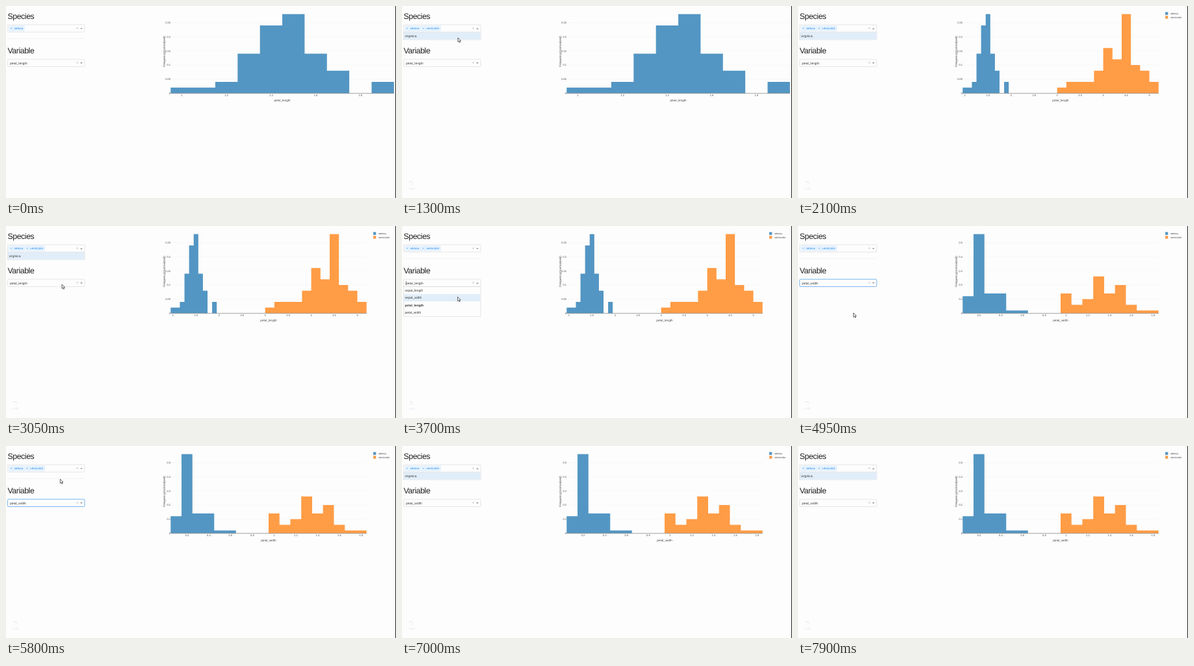
Animation, 600 px wide and 296 px high, one loop 8000 ms. Source, as an HTML page:

```html
<!DOCTYPE html>
<html lang="en">
<head>
<meta charset="utf-8">
<title>Iris histogram</title>
<style>
  html, body { margin: 0; width: 100%; height: 100%; overflow: hidden; background: #fdfdfd; }
  svg { display: block; width: 600px; height: 296px; }
  text { font-family: "Liberation Sans", Arial, sans-serif; text-rendering: geometricPrecision; fill: #444; }
  .head { font-size: 12.3px; letter-spacing: -.4px; fill: #222; }
  .opt { font-size: 4.9px; fill: #333; }
  .tag { font-size: 4.7px; fill: #1a85e8; }
  .tick { font-size: 4px; }
  .title { font-size: 4.65px; }
  .mid { text-anchor: middle; }
  .end { text-anchor: end; }
  .box { fill: #fdfdfd; stroke: #ccc; stroke-width: .5; }
  .focus { stroke: #4a9be8; stroke-width: .75; }
  .hot { fill: #e1eef9; }
  .grey { fill: #888; }
  .pill { fill: #ebf5ff; stroke: #c2e0ff; stroke-width: .4; }
  .grid { stroke: #f0f0f0; stroke-width: .5; }
  .axis { stroke: #666; stroke-width: .6; }
  .caret { stroke: #222; stroke-width: .5; }
  .undo { fill: none; stroke: #dfe6ef; stroke-width: .7; }
</style>
</head>
<body>
<svg viewBox="0 0 600 296">
  <rect width="600" height="296" fill="#fdfdfd"/>
  <rect x="599" width="1" height="296" fill="#222"/>
  <text class="head" x="2.4" y="20">Species</text>
  <text class="head" x="2.4" y="73.2">Variable</text>
  <path d="M2 50.3H121" stroke="#ececec" stroke-width=".6"/>
  <g id="chart"></g>
  <g id="form"></g>
  <g id="undo">
    <path class="undo" d="M12.4 270V272H14.4M12.6 271.9C14 270.2 16.8 271 16.8 273.2C16.8 275 15 275.8 13.6 275.2"/>
    <text class="mid" x="14.7" y="283" style="font-size:4.6px;fill:#dfe6ef">undo</text>
  </g>
  <path id="cursor" d="M0 0V6.4L1.5 5.1 2.6 7.4 3.6 6.9 2.6 4.7H4.6Z" fill="#fff" stroke="#222" stroke-width=".7"/>
</svg>
<script>
const $ = id => document.getElementById(id);
const LEFT = 253.3, BASE = 134.5, PLOT_H = 122;
const MENU_Y = 93.5, ROW = 11.35;
const COLORS = ['#5396c3', '#ff9c46'];
const SPECIES = ['setosa', 'versicolor', 'virginica'];
const VARS = ['sepal_length', 'sepal_width', 'petal_length', 'petal_width'];

// Flowers per bin, 50 of each species; axes and ticks follow from these
const bins = (from, size, ...counts) => ({ from, size, counts });
const setosaLength = bins(.95, .1, 1, 1, 2, 7, 12, 14, 7, 4, 0, 2);
const charts = [
  { name: VARS[2], series: [setosaLength] },
  { name: VARS[2], series: [setosaLength, bins(3, .2, 1, 2, 2, 2, 4, 8, 6, 14, 5, 4, 2)] },
  { name: VARS[3], series: [bins(.05, .1, 6, 28, 7, 7, 1, 1), bins(.95, .1, 7, 3, 5, 13, 7, 10, 3, 1, 1)] }
];

const text = (cls, x, y, s, extra = '') => `<text class="${cls}" x="${x}" y="${y}" ${extra}>${s}</text>`;
const rect = (x, y, w, h, attrs) => `<rect x="${x}" y="${y}" width="${w}" height="${h}" ${attrs}/>`;
const line = (cls, d) => `<path class="${cls}" d="${d}"/>`;

function ticks(lo, hi, rough) {
  const step = [.05, .1, .2, .5].find(s => s >= rough);
  const first = Math.ceil(lo / step), n = Math.floor(hi / step + .01) - first + 1;
  return Array.from({ length: n }, (_, i) => +((first + i) * step).toFixed(2));
}

function drawChart({ name, series }) {
  const legend = series.length > 1, right = legend ? 554.7 : 596.8;
  const lo = series[0].from;
  const hi = Math.max(...series.map(s => s.from + s.size * s.counts.length));
  const top = Math.max(...series.flatMap(s => s.counts)) / 50;
  const sx = v => LEFT + (v - lo) / (hi - lo) * (right - LEFT);
  const sy = v => BASE - v / top * PLOT_H;
  let out = '';
  for (const v of ticks(0, top, top / 6)) {
    if (v) out += line('grid', `M${LEFT} ${sy(v)}H${right}`);
    out += text('tick end', 253, sy(v) + 1.5, v);
  }
  series.forEach((s, k) => {
    let d = `M${sx(s.from)} ${BASE}`;
    s.counts.forEach((n, i) => d += `V${sy(n / 50)}H${sx(s.from + (i + 1) * s.size)}`);
    out += `<path d="${d}V${BASE}Z" fill="${COLORS[k]}"/>`;
    if (legend) out += rect(565, 9.4 + k * 5.9, 4.3, 4.3, `fill="${COLORS[k]}"`) +
      text('tick', 573, 12.9 + k * 5.9, SPECIES[k]);
  });
  out += line('axis', `M${LEFT} ${BASE + .2}H${right}`);
  for (const v of ticks(lo, hi, (hi - lo) / 9.5)) out += text('tick mid', sx(v), 139.4, v);
  return out + text('title mid', (LEFT + right) / 2, 146.6, name) +
    text('title mid', 0, 0, 'Frequency(normalized)', 'transform="translate(244.6 70) rotate(-90)"');
}

const select = (y, open, focus) =>
  rect(2.6, y, 118.4, 11.3, `rx="1.3" class="box ${focus ? 'focus' : ''}"`) +
  text('opt mid grey', 109.8, y + 7.2, '×') +
  line('grey', open ? `M114.2 ${y + 6.8}h3.6l-1.8-1.9z` : `M114.2 ${y + 5}h3.6l-1.8 1.9z`);

const tag = (x, w, s) =>
  rect(x, 30.6, w, 7.9, 'rx=".7" class="pill"') + line('pill', `M${x + 6} 30.6v7.9`) +
  text('tag mid', x + 3.2, 36.1, '×') + text('tag', x + 7.9, 36.2, s);

const menu = (y, items, hot, chosen) =>
  rect(2.6, y, 118.4, ROW * items.length + .3, 'class="box"') + items.map((s, i) =>
    (i === hot ? rect(2.9, y + i * ROW + .2, 117.8, ROW - .1, 'class="hot"') : '') +
    text('opt', 4.5, y + i * ROW + 7.5, s, s === chosen ? 'font-weight="bold"' : '')).join('');

function drawForm(s) {
  let out = select(28.9, s.speciesOpen) + tag(4.6, 23.6, SPECIES[0]);
  if (s.both) out += tag(29.4, 30, SPECIES[1]);
  out += select(82.1, s.varOpen, s.focus) + text('opt', 6, 89.5, s.value);
  if (s.speciesOpen) out += menu(40.3, SPECIES.slice(s.both ? 2 : 1), 0);
  if (s.varOpen) out += menu(MENU_Y, VARS, s.hot, s.value) + line('caret', 'M6.2 85V91');
  return out;
}

// Each glide eases out, then rests until its last moment
const glides = [
  { at: 350, end: 650, until: 1750, from: [84, 39], to: [86, 49] },
  { at: 2600, end: 2850, until: 3400, from: [85, 46], to: [86, 90] },
  { at: 3400, end: 4600, until: 5350, from: [86, 90], to: [85.3, 134] },
  { at: 5350, end: 6050, until: 6400, from: [84, 134], to: [83.3, 39] },
  { at: 7300, end: 7550, until: 7900, from: [80, 43], to: [79, 47] }
];

function cursorAt(t) {
  const g = glides.find(g => t >= g.at && t < g.until);
  if (!g) return null;
  const left = 1 - Math.min(1, (t - g.at) / (g.end - g.at));
  return g.to.map((v, i) => v + (g.from[i] - v) * left * left);
}

const last = {};
function put(id, data, draw) {
  const key = JSON.stringify(data);
  if (last[id] === key) return;
  last[id] = key;
  $(id).innerHTML = draw(data);
}

function render(t) {
  const within = (a, b) => t >= a && t < b;
  const pos = cursorAt(t);
  const varOpen = within(3400, 4900);
  const row = varOpen ? Math.floor((pos[1] - MENU_Y) / ROW) : -1;
  const both = t >= 1100;
  put('chart', charts[(t >= 1350) + (t >= 4950)], drawChart);
  put('form', {
    both, varOpen,
    speciesOpen: within(200, 3400) || t >= 7000,
    hot: row < 0 ? 2 : row,
    value: VARS[t < 4900 ? 2 : 3],
    focus: within(4900, 7000)
  }, drawForm);
  $('undo').style.display = both ? '' : 'none';
  $('cursor').style.display = pos ? '' : 'none';
  if (pos) $('cursor').setAttribute('transform', `translate(${pos})`);
}

const start = performance.now();
function tick() {
  render((performance.now() - start) % 8000);
  requestAnimationFrame(tick);
}
tick();
</script>
</body>
</html>
```
